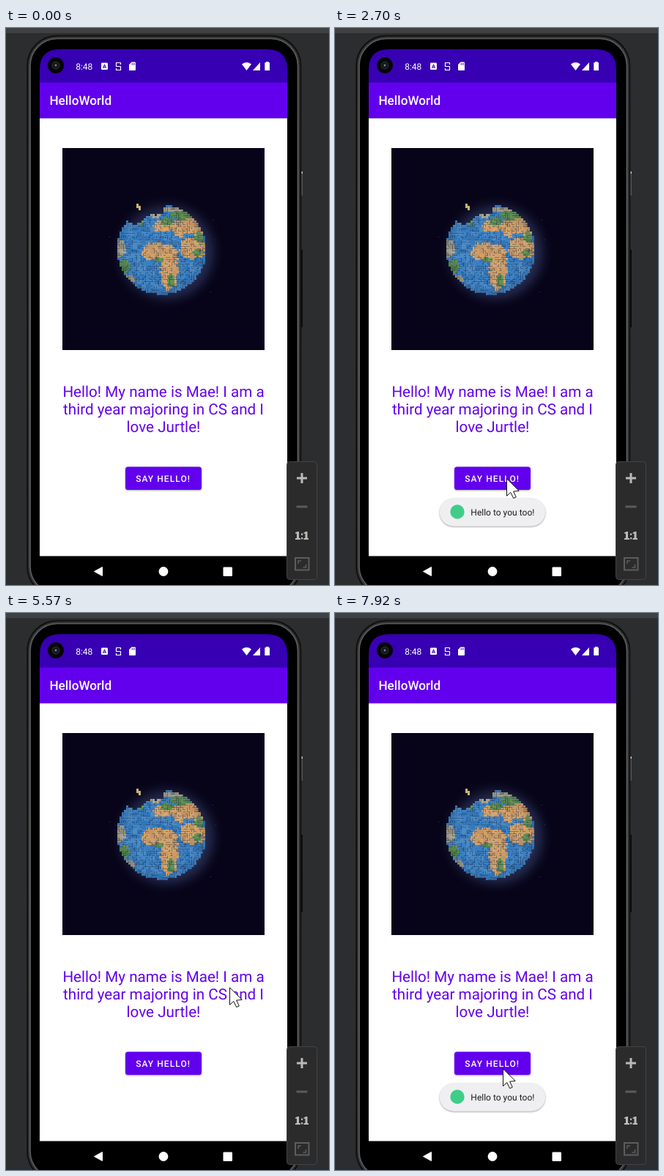
An HTML page with a canvas that plays this animation: 441 by 761 pixels, repeating every 8 s.

```html
<!DOCTYPE html>
<html lang="en">
<head>
<meta charset="utf-8">
<title>HelloWorld</title>
<style>
html, body { margin: 0; width: 100%; height: 100%; overflow: hidden; background: #2c2d2f; }
svg, canvas { position: absolute; left: 0; top: 0; display: block; }
#photo { left: 77px; top: 164px; }
text { font-family: Roboto, sans-serif; white-space: pre; text-rendering: geometricPrecision; }
.medium { font-weight: 500; }
#rest { filter: drop-shadow(0 1px 1px rgba(0,0,0,.35)); }
#lift { filter: drop-shadow(0 3px 4px rgba(0,0,0,.32)); opacity: 0; }
#toast { transform-origin: 215px 662px; opacity: 0; }
#shade { filter: drop-shadow(0 1px 1.2px rgba(0,0,0,.4)); }
#ripple, #cursor { opacity: 0; }
</style>
</head>
<body>
<svg width="441" height="761" viewBox="0 0 441 761">
  <defs>
    <clipPath id="buttonClip"><rect x="163" y="599.5" width="104" height="31.5" rx="3.5"/></clipPath>
    <radialGradient id="glowFill">
      <stop offset="0" stop-color="#fff" stop-opacity=".24"/>
      <stop offset=".6" stop-color="#fff" stop-opacity=".2"/>
      <stop offset="1" stop-color="#fff" stop-opacity="0"/>
    </radialGradient>
    <linearGradient id="rim" x2="0" y2="1">
      <stop offset="0" stop-color="#5a5b5a"/>
      <stop offset=".5" stop-color="#6b6c6b"/>
      <stop offset="1" stop-color="#5a5b5a"/>
    </linearGradient>
  </defs>

  <rect width="441" height="761" fill="#2c2d2f"/>
  <rect width="441" height="7" fill="#3e4042"/>

  <!-- phone -->
  <rect x="402" y="196" width="3" height="33" fill="#55565a"/>
  <rect x="403" y="196" width="2" height="3" fill="#c9c5ae"/>
  <rect x="402" y="303" width="3" height="106" fill="#090909"/>
  <rect x="28.5" y="10" width="374.500" height="767" rx="41" fill="#0a0a0a" stroke="#171819"/>
  <rect x="32" y="13.500" width="367.500" height="760" rx="38" fill="#020202" stroke="#323332" stroke-width="4"/>
  <rect x="33" y="14.500" width="365.500" height="758" rx="37" fill="#020202" stroke="url(#rim)" stroke-width="1.600"/>
  <rect x="36" y="17.500" width="359.500" height="752" rx="34" fill="#000"/>

  <!-- screen -->
  <path d="M46 75V57Q46 29 74 29H356Q384 29 384 57V75Z" fill="#3700b3"/>
  <rect x="46" y="74.500" width="338" height="49" fill="#6200ee"/>
  <rect x="46" y="123.400" width="338" height="598.600" fill="#fff"/>
  <rect x="46" y="721.500" width="338" height="39.500" fill="#000"/>

  <circle cx="68" cy="51" r="11" fill="#060608"/>
  <circle cx="68" cy="51" r="5" fill="#15171a" stroke="#2f3236"/>
  <circle cx="68" cy="51" r="1.400" fill="#7d838b"/>

  <g fill="#fff">
    <text x="95.2" y="57" font-size="12">8:48</text>
    <rect x="130" y="47.500" width="9" height="9.500" rx="1.200"/>
    <text x="134.500" y="55" font-size="7.500" font-weight="700" text-anchor="middle" style="fill:#3700b3">A</text>
    <path d="M156.500 50V47.500H150.500V52.500H156.500V57.500H150.500V55" fill="none" stroke="#fff" stroke-width="1.200" stroke-linejoin="round"/>
    <path d="M171.500 46.500H176Q177 46.500 177 47.500V57Q177 58 176 58H169Q168 58 168 57V50Z"/>
    <path d="M172 48v2.500M173.800 48v2.500M175.600 48v2.500" stroke="#3700b3" stroke-width=".8"/>
    <path d="M322 49.500Q328.500 44.700 335 49.500L328.500 58Z"/>
    <path d="M347 47V58H337Z"/>
    <path d="M355 47.300V46H358.500V47.300H360V58H353.300V47.300Z"/>
    <text class="medium" x="59.400" y="105.300" font-size="17.200">HelloWorld</text>
    <path d="M120.500 742.500L131.500 736.500V748.500Z" stroke="#fff" stroke-linejoin="round"/>
    <circle cx="215" cy="742.500" r="6.400"/>
    <rect x="296.500" y="736.500" width="12.500" height="12.500" rx="1.200"/>
  </g>

  <g fill="#6200ee" font-size="20.640" text-anchor="middle">
    <text x="215" y="504">Hello! My name is Mae! I am a</text>
    <text x="215" y="528">third year majoring in CS and I</text>
    <text x="215" y="552">love Jurtle!</text>
  </g>

  <!-- button -->
  <rect id="lift" x="163" y="599.500" width="104" height="31.500" rx="3.500" fill="#6200ee"/>
  <rect id="rest" x="163" y="599.500" width="104" height="31.500" rx="3.500" fill="#6200ee"/>
  <g clip-path="url(#buttonClip)"><circle id="ripple" r="75" fill="url(#glowFill)"/></g>
  <text class="medium" x="177.200" y="619.500" font-size="12.040" letter-spacing="1.070" fill="#fff">SAY HELLO!</text>

  <!-- toast -->
  <g id="toast">
    <rect id="shade" x="143" y="642.500" width="144" height="38" rx="19" fill="#efeff2"/>
    <rect id="pill" x="143" y="642.500" width="144" height="38" rx="19" fill="#efeff2"/>
    <g id="message">
      <circle cx="167" cy="661" r="9.700" fill="#3fce87"/>
      <text x="185.300" y="665.800" font-size="12.040" fill="#1b1b1f">Hello to you too!</text>
    </g>
  </g>

  <!-- zoom panel -->
  <rect x="383.500" y="592.500" width="41" height="161" rx="4" fill="#2b2b2c" stroke="#434446"/>
  <path d="M397 615H411M404 608V622" stroke="#b9b9b6" stroke-width="3"/>
  <path d="M396.500 654H411.500" stroke="#5a5b5c" stroke-width="3"/>
  <g fill="#bcbcb8">
    <path d="M395 689.500L398 688H400V697H402V699H395V697H397V690.800H395Z"/>
    <path d="M406.500 689.500L409.500 688H411.500V697H413V699H406.500V697H408.500V690.800H406.500Z"/>
    <rect x="403" y="690.500" width="2.200" height="2.400"/>
    <rect x="403" y="696" width="2.200" height="2.400"/>
  </g>
  <g fill="none" stroke="#5c5d5e" stroke-width="2">
    <rect x="395" y="724" width="18.500" height="16.500"/>
    <path d="M399 732V728H403M409.500 733V737H405.500" stroke-width="1.600"/>
  </g>
</svg>

<canvas id="photo" width="276" height="276"></canvas>

<svg width="441" height="761" viewBox="0 0 441 761">
  <path id="cursor" d="M.5 .8V24.300L5.800 19.500L9.700 27.500L13.300 25.900L9.600 18.100L17.200 17.400Z" fill="#fff" stroke="#111" stroke-width="1"/>
</svg>

<script>
const $ = id => document.getElementById(id);
const LOOP = 8000;

// ---- block planet ----
const SAND = '#cf9e68', GREEN = '#5a8c50', STONE = '#a9a48e', SEA = '#3b80c2';
const patches = [
  [128, 142, 19, 13, SAND], [144, 146, 14, 14, SAND], [146, 168, 12, 26, SAND],
  [148, 181, 5, 9, GREEN], [132, 153, 7, 3, GREEN],
  [138, 106, 14, 9, SAND], [172, 108, 24, 16, SAND], [178, 137, 17, 16, SAND],
  [143, 100, 9, 6, GREEN], [163, 92, 15, 6, GREEN], [172, 120, 9, 4, SEA],
  [187, 122, 6, 7, GREEN], [184, 143, 6, 6, GREEN], [142, 124, 16, 4, SEA],
  [150, 84, 24, 4, STONE], [126, 90, 9, 5, STONE], [79, 138, 8, 12, STONE],
  [85, 162, 7, 10, GREEN], [92, 180, 8, 6, STONE], [108, 103, 4, 3, GREEN]
];
const noise = (x, y) => {
  const n = Math.sin(x * 12.9898 + y * 78.233) * 43758.5453;
  return n - Math.floor(n);
};

function drawPlanet() {
  const g = $('photo').getContext('2d');
  const box = (color, x, y, w, h) => { g.fillStyle = color; g.fillRect(x, y, w, h); };
  box('#070419', 0, 0, 276, 276);
  const glow = g.createRadialGradient(144, 143, 48, 142, 142, 80);
  glow.addColorStop(0, '#2c3358');
  glow.addColorStop(.4, 'rgba(32,37,70,.75)');
  glow.addColorStop(1, 'rgba(7,4,25,0)');
  box(glow, 0, 0, 276, 276);

  const size = 3;
  for (let y = 78; y < 202; y += size) {
    for (let x = 72; x < 200; x += size) {
      const d = Math.hypot(x + 1.5 - 135.5, y + 1.5 - 139) / 61;
      const top = 97 + 11 * noise(Math.floor(x / 6), 3) - Math.max(0, x - 105) * .6;
      if (d > 1 || y < top) continue;
      let color = SEA;
      for (const [px, py, rx, ry, c] of patches) {
        const e = ((x + 1.5 - px) / rx) ** 2 + ((y + 1.5 - py) / ry) ** 2;
        if (e < .85 + .3 * noise(x, y)) color = c;
      }
      box(color, x, y, size, size);
      const tone = noise(Math.floor(x / 6), Math.floor(y / 6)) - .5;
      box(tone > 0 ? `rgba(255,240,210,${tone * .2})` : `rgba(0,15,50,${-tone * .25})`, x, y, size, size);
      if (noise(x + 7, y) > .7) box('rgba(10,25,55,.35)', x + 2, y, 1, size);
      if (noise(x, y + 9) > .65) box('rgba(10,25,55,.35)', x, y + 2, size, 1);
      box(`rgba(8,10,40,${Math.max(0, d - .8) * .6})`, x, y, size, size);
    }
  }
  box('#c9b277', 101, 76, 3, 6);
  box('#c9b277', 104, 79, 3, 6);
  for (const [x, y] of [[209, 125], [205, 98], [64, 121], [202, 196]]) box('#303a66', x, y, 1, 1);
}
drawPlanet();

// ---- motion: rows are [time, properties, steps to the next row] ----
function play(id, rows) {
  const frames = rows.map(([t, props, n = 1]) => ({
    ...props, offset: Math.max(0, (t - 4) / LOOP), easing: `steps(${n})`
  }));
  frames.push({ ...frames[frames.length - 1], offset: 1 });
  $(id).animate(frames, { duration: LOOP, iterations: Infinity });
}

const path = [
  [0, 381, 731], [600, 381, 731, 2], [740, 345, 680, 2], [870, 305, 640, 2],
  [1010, 270, 622, 2], [1140, 253, 615, 3], [1350, 234, 615],
  [5090, 234, 615, 7], [5570, 305, 511, 5], [5920, 329, 426],
  [5990, 348, 422, 2], [6130, 373, 450, 2], [6270, 320, 535, 3], [6490, 229, 622]
];
play('cursor', path.map(([t, x, y, n]) =>
  [t, { opacity: t < 600 ? 0 : 1, transform: `translate(${x}px, ${y}px)` }, n]));

const clicks = [[1750, 234, 615], [7010, 229, 622]];
const perClick = make => clicks.flatMap(make);

play('ripple', [[0, { opacity: 0, transform: 'translate(234px, 615px) scale(.2)' }],
  ...perClick(([t, x, y]) => {
    const at = (opacity, s) => ({ opacity, transform: `translate(${x}px, ${y}px) scale(${s})` });
    return [[t, at(.6, .25), 5], [t + 330, at(1, 1), 3], [t + 530, at(.75, 1.6), 3], [t + 750, at(0, 1.7)]];
  })]);

play('lift', [[0, { opacity: 0 }], ...perClick(([t]) => [
  [t, { opacity: 0 }, 3], [t + 200, { opacity: 1 }], [t + 400, { opacity: 1 }, 5], [t + 750, { opacity: 0 }]
])]);

const rise = t => [
  [t + 190, { opacity: 0, transform: 'scale(.93)' }, 2],
  [t + 330, { opacity: 1, transform: 'scale(.955)' }, 3],
  [t + 530, { opacity: 1, transform: 'scale(1)' }]
];
play('toast', [
  [0, { opacity: 0, transform: 'scale(.93)' }],
  ...rise(1750),
  [4300, { opacity: 1, transform: 'scale(1)' }, 5],
  [4630, { opacity: 0, transform: 'scale(1)' }],
  ...rise(7010)
]);

play('pill', [[0, { fill: '#e7e7e7' }], ...perClick(([t]) => [
  [t, { fill: '#e7e7e7' }], [t + 330, { fill: '#e7e7e7' }, 3], [t + 530, { fill: '#efeff2' }]
])]);
for (const id of ['shade', 'message']) {
  play(id, [[0, { opacity: 0 }], ...perClick(([t]) => [
    [t, { opacity: 0 }], [t + 330, { opacity: 0 }, 4], [t + 610, { opacity: 1 }]
  ])]);
}
</script>
</body>
</html>
```
